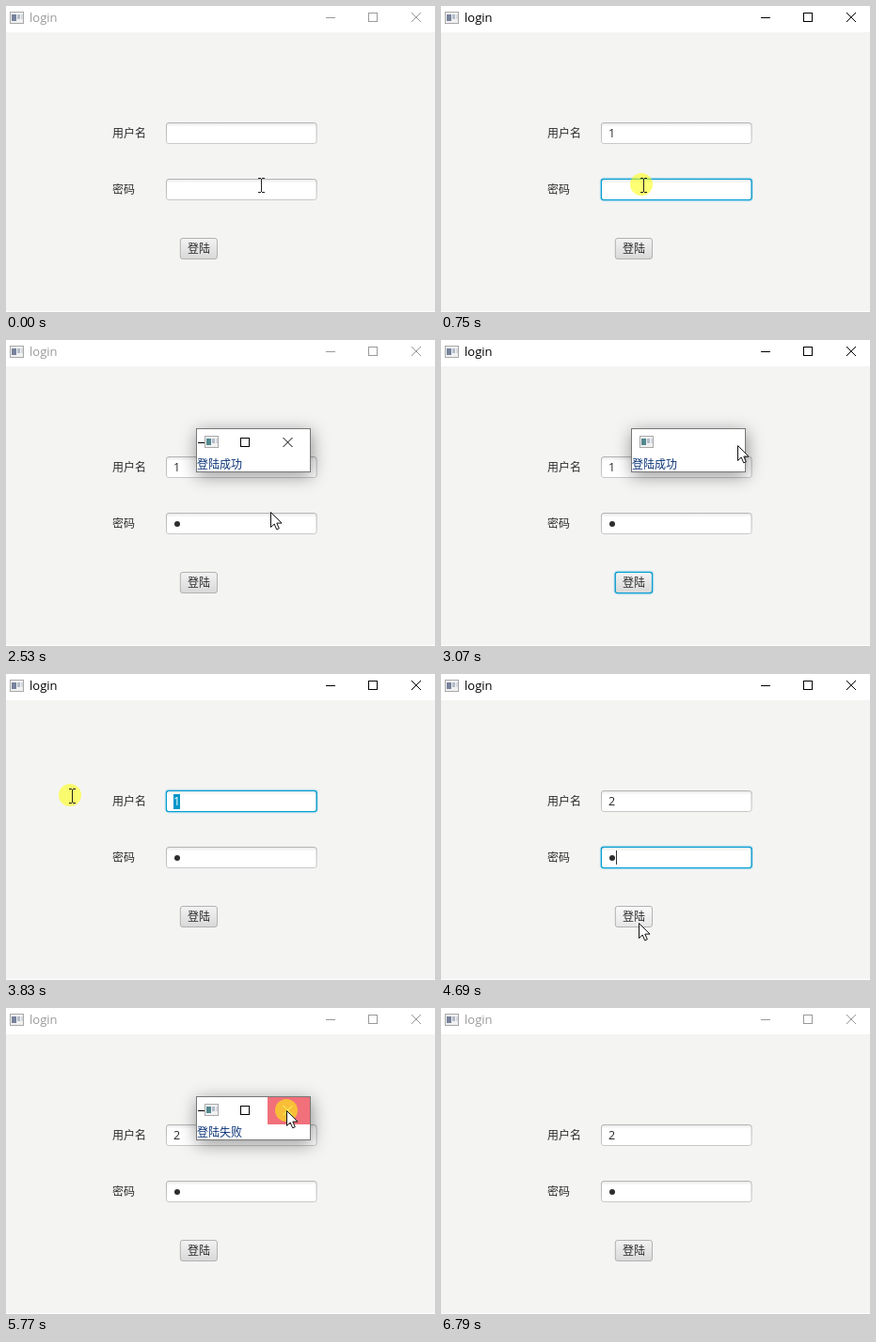
An HTML page that plays this animation: 456x326 px, repeating every 6860 ms.

```html
<!DOCTYPE html>
<html lang="zh">
<head>
<meta charset="utf-8">
<title>login</title>
<style>
  html, body { margin: 0; width: 100%; height: 100%; overflow: hidden; background: #f4f4f3; }
  svg { display: block; }
  text { font: 12px "Noto Sans CJK SC", "Noto Sans CJK", sans-serif; fill: #2a2a2a; }
  .caption { font: 13px "Open Sans", sans-serif; }
  .value { font: 12.5px "Open Sans", sans-serif; }
  .line { fill: none; stroke: currentColor; }
  .crisp { shape-rendering: crispEdges; }
  #bar { color: #999; }
  #bar.active { color: #000; }
  #bar text { fill: currentColor; }
  .box { fill: url(#inset); stroke: url(#edge); }
  .ring { fill: none; stroke: #039ed3; stroke-width: 1.3; }
  .halo { fill: none; stroke: #039ed3; stroke-width: 1.2; opacity: .16; }
  #button .box { fill: url(#face); stroke: #b2b2b2; }
  #button.hover .box { fill: url(#faceHover); }
  #button.pressed .box { fill: url(#facePressed); }
  #dialog { filter: drop-shadow(1px 4px 9px rgba(0, 0, 0, .42)); }
  #message { fill: #0a3376; }
</style>
</head>
<body>
<svg width="456" height="326" viewBox="0 0 456 326">
  <defs>
    <linearGradient id="inset" x2="0" y2="1">
      <stop offset="0" stop-color="#e8e8e8"/><stop offset=".2" stop-color="#fff"/>
    </linearGradient>
    <linearGradient id="edge" x2="0" y2="1">
      <stop offset="0" stop-color="#b4b4b4"/><stop offset="1" stop-color="#c8c8c8"/>
    </linearGradient>
    <linearGradient id="face" x2="0" y2="1">
      <stop offset="0" stop-color="#f3f3f3"/><stop offset="1" stop-color="#d8d8d8"/>
    </linearGradient>
    <linearGradient id="faceHover" x2="0" y2="1">
      <stop offset="0" stop-color="#fafafa"/><stop offset="1" stop-color="#e6e6e6"/>
    </linearGradient>
    <linearGradient id="facePressed" x2="0" y2="1">
      <stop offset="0" stop-color="#dcdcdc"/><stop offset="1" stop-color="#c8c8c8"/>
    </linearGradient>
    <g id="icon">
      <rect x=".5" y=".5" width="14" height="12" fill="#f1f1f1" stroke="#a8a8a8"/>
      <rect x="2" y="3" width="5" height="7" fill="currentColor"/>
      <rect x="8" y="3" width="3" height="5" fill="#b3bccb"/>
      <rect x="12" y="3" width="2" height="5" fill="#d6dae0"/>
    </g>
    <path id="square" class="line crisp" d="M.5 .5h9v9h-9z"/>
    <path id="cross" class="line" d="M0 0l10 10M10 0l-10 10"/>
    <g id="fieldFocus">
      <rect class="halo" x="-.8" y="-.8" width="162.2" height="24.6" rx="3.5"/>
      <rect class="ring" x=".4" y=".4" width="159.8" height="22.2" rx="2.5"/>
    </g>
    <rect id="field" class="box" x=".5" y=".5" width="159.6" height="22" rx="2.5"/>
  </defs>

  <rect width="456" height="326" fill="#f4f4f3"/>
  <rect width="456" height="28" fill="#fff"/>
  <rect y="325" width="456" height="1" fill="#fff"/>
  <g id="bar">
    <use href="#icon" x="4" y="6" color="#77829c"/>
    <text class="caption" x="25" y="17">login</text>
    <path class="line crisp" d="M340 12.5h10"/>
    <use href="#square" x="385" y="7"/>
    <use href="#cross" x="431" y="7"/>
  </g>

  <text x="113" y="140">用户名</text>
  <text x="113" y="200">密码</text>

  <g transform="translate(170 124)">
    <use href="#field"/>
    <use id="userFocus" href="#fieldFocus"/>
    <rect id="selection" x="8" y="4" width="7" height="16" fill="#0096c9"/>
    <text id="user" class="value" x="8" y="16"></text>
  </g>

  <g transform="translate(170 184)">
    <use href="#field"/>
    <use id="passFocus" href="#fieldFocus"/>
    <circle id="dot" cx="12" cy="12" r="3" fill="#2d2d2d"/>
    <path id="caret" class="crisp" d="M16.5 4v15" stroke="#333"/>
  </g>

  <g id="button" transform="translate(185 247)">
    <rect class="box" x=".3" y=".5" width="39.2" height="22" rx="2.5"/>
    <g id="buttonFocus">
      <rect class="halo" x="-1" y="-.8" width="41.8" height="24.6" rx="3.5"/>
      <rect class="ring" x=".2" y=".4" width="39.4" height="22.2" rx="2.5"/>
    </g>
    <text x="8" y="16">登陆</text>
  </g>

  <g id="dialog" transform="translate(202 94)">
    <rect id="frame" class="crisp" x=".5" y=".5" height="46" fill="#fff" stroke="#777"/>
    <g id="controls">
      <rect id="closeBack" x="76" y="1" width="45" height="29"/>
      <path class="line crisp" d="M2 15.5h8"/>
      <use href="#square" x="47" y="10"/>
      <use id="closeMark" href="#cross" x="92.5" y="10"/>
    </g>
    <use href="#icon" x="9" y="8" color="#52888e"/>
    <text id="message" x="1" y="43"></text>
  </g>

  <circle id="glow" r="12" fill="#ff0" fill-opacity=".55"/>
  <path id="beam" class="line crisp" d="M-1 -6.5h3M3 -6.5h3M2.5 -6v14M-1 8.5h3M3 8.5h3" color="#222"/>
  <path id="arrow" d="M.5 .5v16l3.7-3.5 2.5 5.8 2.6-1.1-2.5-5.6h5.2z" fill="#fff" stroke="#111"/>
</svg>
<script>
const LOOP = 6860, STEP = 76.7, BLUR = 6790;
const el = {};
document.querySelectorAll("svg [id]").forEach(node => el[node.id] = node);

const areas = {
  user: { x: 170, y: 124, w: 161, h: 23 },
  pass: { x: 170, y: 184, w: 161, h: 23 },
  button: { x: 185, y: 247, w: 40, h: 23 },
  dialog: { x: 202, y: 94, w: 122, h: 47 },
  close: { x: 278, y: 95, w: 46, h: 29 }
};
const hits = (name, { x, y }) => {
  const a = areas[name];
  return x >= a.x && x < a.x + a.w && y >= a.y && y < a.y + a.h;
};

// Where the pointer arrives and, if it presses there, for how long
const stops = [
  { at: 0, x: 269, y: 190 },
  { at: 300, x: 214, y: 136, hold: 150 },
  { at: 675, x: 213, y: 190, hold: 150 },
  { at: 975, x: 228, y: 207 },
  { at: 1525, x: 210, y: 256, hold: 150 },
  { at: 2300, x: 188, y: 246 },
  { at: 2675, x: 330, y: 150 },
  { at: 2905, x: 306, y: 109, hold: 85 },
  { at: 3050, x: 315, y: 112 },
  { at: 3595, x: 192, y: 136, hold: 485, drag: true },
  { at: 3750, x: 60, y: 116 },
  { at: 3900, x: 74, y: 137 },
  { at: 4305, x: 225, y: 191, hold: 150 },
  { at: 4670, x: 210, y: 265 },
  { at: 4765, x: 210, y: 265, hold: 150 },
  { at: 5540, x: 298, y: 109 },
  { at: 5690, x: 298, y: 109, hold: 160 },
  { at: 6150, x: 436, y: 332 }
];
const presses = stops.filter(s => s.hold);
const drag = presses.find(p => p.drag);
const end = p => p.at + p.hold;
const typed = { user: presses[0].at + 150, pass: presses[1].at + 225, again: end(drag) };

// A press on the button opens a dialog; the next press closes it
const dialogs = presses.flatMap((p, i) =>
  hits("button", p) ? [{ open: p.at + 235, shut: end(presses[i + 1]) }] : []);

const show = (node, on) => node.style.display = on ? "" : "none";

function pointerAt(t) {
  const time = Math.floor((t + 20) / STEP) * STEP;
  const i = stops.findIndex(s => s.at > time);
  if (i < 0) return stops.at(-1);
  const a = stops[i - 1], b = stops[i];
  const travel = Math.min(370, 160 + 1.2 * Math.hypot(b.x - a.x, b.y - a.y));
  const leave = Math.max(a.at, b.at - travel);
  const k = Math.max(0, (time - leave) / (b.at - leave));
  const ease = k * k * (3 - 2 * k);
  const mix = axis => Math.round(a[axis] + (b[axis] - a[axis]) * ease);
  return { x: mix("x"), y: mix("y") };
}

function focusAt(t) {
  const last = presses.findLast(p => p.at <= t && !hits("close", p));
  return last && ["user", "pass", "button"].find(name => hits(name, last));
}

function drawDialog(t, pointer, pressed) {
  const d = dialogs.find(d => t >= d.open && t < d.shut + 230);
  show(el.dialog, d);
  if (!d) return;
  const closing = t >= d.shut;
  const fadeIn = (t - d.open + 75) / 180, fadeOut = (d.shut + 230 - t) / 150;
  const opacity = Math.min(1, fadeIn, fadeOut);
  el.dialog.setAttribute("opacity", opacity);
  el.frame.setAttribute("width", opacity < 1 ? 120 : 121);
  el.message.textContent = t < typed.again ? "登陆成功" : "登陆失败";
  show(el.controls, !closing);
  const hover = hits("close", pointer);
  el.closeBack.setAttribute("fill", !hover ? "none" : pressed ? "#f1707a" : "#e81123");
  el.closeMark.style.color = hover ? "#fff" : "#000";
}

function draw(t) {
  const pointer = pointerAt(t);
  const pressed = presses.some(p => t >= p.at && t < end(p));
  const modal = dialogs.some(d => t >= d.open && t < d.shut);
  const active = t >= presses[0].at && t < BLUR && !modal;
  const focus = active && focusAt(t);
  const dragging = t >= drag.at && t < end(drag);
  const selected = dragging && t > drag.at + STEP;

  el.bar.classList.toggle("active", active);
  for (const name of ["user", "pass", "button"]) show(el[name + "Focus"], focus === name);

  el.user.textContent = t < typed.user ? "" : t < typed.again ? "1" : "2";
  el.user.style.fill = selected ? "#fff" : "";
  show(el.selection, selected);
  show(el.dot, t >= typed.pass);
  show(el.caret, focus === "pass" && t >= typed.pass);

  const overButton = hits("button", pointer);
  el.button.classList.toggle("hover", overButton);
  el.button.classList.toggle("pressed", overButton && pressed);
  drawDialog(t, pointer, pressed);

  const overField = hits("user", pointer) || hits("pass", pointer);
  const beam = dragging || overField && !(modal && hits("dialog", pointer));
  show(el.beam, beam);
  show(el.arrow, !beam);
  show(el.glow, pressed);
  for (const node of [el.beam, el.arrow, el.glow])
    node.setAttribute("transform", `translate(${pointer.x} ${pointer.y})`);
}

let start;
function tick(now) {
  start ??= now;
  draw((now - start) % LOOP);
  requestAnimationFrame(tick);
}
draw(0);
requestAnimationFrame(tick);
</script>
</body>
</html>
```
